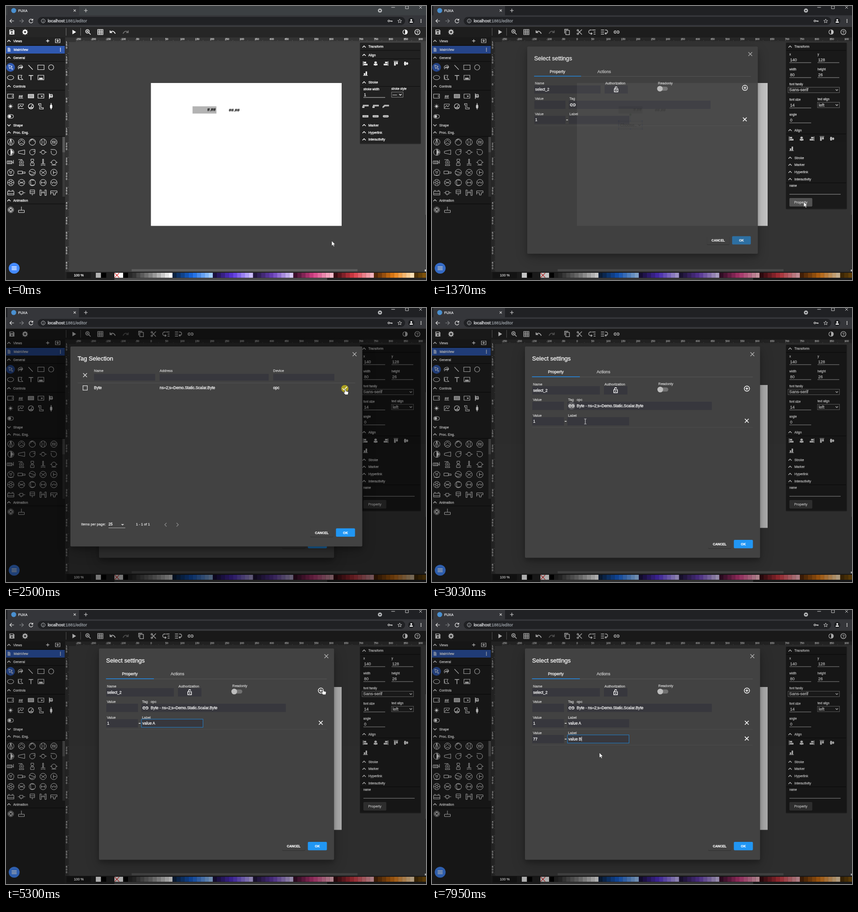
These frames come from a looping animation (926x605 px, 8000 ms). An HTML page:

```html
<!DOCTYPE html>
<html lang="en">
<head>
<meta charset="utf-8">
<title>Editor</title>
<style>
html,body{margin:0;width:100%;height:100%;overflow:hidden;background:#424242}
svg{display:block;width:926px;height:605px}
text{font-family:"Liberation Sans",Arial,sans-serif;white-space:pre;stroke-width:.28}
.sheet{filter:drop-shadow(0 6px 5px rgba(0,0,0,.2)) drop-shadow(0 9px 14px rgba(0,0,0,.24))}
#shade1,#shade2{animation:shade1 8s infinite cubic-bezier(.25,.8,.25,1)}
#shade2{animation-name:shade2}
#settings,#tags{animation:settings 8s infinite cubic-bezier(0,0,.2,1);transform-origin:464px 318px}
#tags{animation-name:tags;transform-origin:464px 306px}
#settings .ok{animation:ok 8s infinite ease-out}
#cursor{animation:cursor 8s infinite ease-in-out}
@keyframes shade1{0%,15.875%{opacity:0}20.875%,100%{opacity:1}}
@keyframes shade2{0%,22.375%{opacity:0}27.375%,32.5%{opacity:1}37.5%,100%{opacity:0}}
@keyframes settings{0%,15.875%{opacity:0;transform:scale(.7)}17.75%,100%{opacity:1;transform:none}}
@keyframes tags{0%,22.375%{opacity:0;transform:scale(.7)}24.25%,32.375%{opacity:1;transform:none}33.31%,100%{opacity:0;transform:none}}
@keyframes ok{0%,15.875%{fill:#424242}18.875%,100%{fill:#2196f3}}
@keyframes cursor{
0%,.75%{transform:translate(718px,518.5px)}
5.25%,6.25%{transform:translate(77px,197px)}
10.625%,12.125%{transform:translate(412px,272px)}
15.25%,17.5%{transform:translate(819.5px,432.5px)}
21%,22.625%{transform:translate(311px,214px)}
30.25%,32.25%{transform:translate(748px,179px)}
37%,62%{transform:translate(338px,250.5px)}
65.5%,67.5%{transform:translate(699px,174.5px)}
71.25%,72.375%{transform:translate(285px,286px)}
74.75%,98.25%{transform:translate(285px,312px)}
98.5%{transform:translate(352px,274px)}
99.25%,100%{transform:translate(369px,315px)}}
</style>
</head>
<body>
<svg id="stage" viewBox="0 0 926 605" xmlns="http://www.w3.org/2000/svg"></svg>
<script>
const UNIT = 32.85; // one ruler step
const rect = (x, y, w, h, fill, more = '') => `<rect x="${x}" y="${y}" width="${w}" height="${h}" fill="${fill}" ${more}/>`;
const disc = (x, y, r, fill, more = '') => `<circle cx="${x}" cy="${y}" r="${r}" fill="${fill}" ${more}/>`;
const text = (x, y, s, size = 7.3, fill = '#fff', more = '') =>
  `<text x="${x}" y="${y}" font-size="${size}" fill="${fill}" stroke="${fill}" ${more}>${s}</text>`;
const mid = 'text-anchor="middle"';
const icon = (x, y, d, color = '#f2f2f2', w = 1.1, fill = 'none') =>
  `<path transform="translate(${x} ${y})" d="${d}" fill="${fill}" stroke="${color}" stroke-width="${w}"/>`;
const solid = (x, y, d, color = '#f2f2f2') => icon(x, y, d, 'none', 0, color);
const group = (id, body) => `<g id="${id}">${body}</g>`;
const ring = r => `M${-r} 0a${r} ${r} 0 1 0 ${2 * r} 0a${r} ${r} 0 1 0 ${-2 * r} 0`;
const box = (w, h) => `M${-w / 2} ${-h / 2}h${w}v${h}h${-w}z`;
const cross = r => `M${-r} ${-r}L${r} ${r}M${r} ${-r}L${-r} ${r}`;
const plus = r => `M${-r} 0H${r}M0 ${-r}V${r}`;
const dots = 'M-.9-4h1.8v1.8h-1.8zM-.9-.9h1.8v1.8h-1.8zM-.9 2.2h1.8v1.8h-1.8z';
const UP = 'M-3.5 2L0-1.6 3.5 2', DOWN = 'M-3.5-1.6L0 2 3.5-1.6', SMALL = 'M-2.6-1.3L0 1.3 2.6-1.3';
const LINK = 'M-.8-2.6h-2.2a2.6 2.6 0 0 0 0 5.2h2.2M.8-2.6h2.2a2.6 2.6 0 0 1 0 5.2h-2.2M-2.8 0h5.6';
const rays = (n, a, b) => Array.from({length: n}, (_, i) => {
  const c = Math.cos(i * 2 * Math.PI / n), s = Math.sin(i * 2 * Math.PI / n);
  return `M${a * c} ${a * s}L${b * c} ${b * s}`;
}).join('');
const section = (x, y, name, d = UP) => icon(x + .5, y, d, '#fff', 1.4) + text(x + 10, y + 2.7, name);

function browser() {
  return rect(0, 0, 926, 21, '#202124', 'id="strip"') + rect(3, -6, 158, 30, '#35363a', 'rx="5"') + rect(0, 20.5, 926, 25, '#35363a') +
    disc(17, 10, 5.5, '#4a90d0') + text(27, 13, 'FUXA', 7.6, '#e8eaed') +
    icon(151.5, 10, cross(2.4), '#ddd') + icon(176, 10, plus(4), '#ddd') +
    disc(824.5, 10, 4.6, '#b4b6b8') + solid(824.5, 10.3, 'M-2.4-1.3h4.8L0 1.8z', '#202124') +
    icon(853.5, 3, 'M-4 0h8', '#ddd', 1) + icon(884, 3, box(6.5, 6), '#ddd', .9) + icon(914, 3, cross(3), '#ddd', .9) +
    icon(13, 33, 'M4.5 0h-9M-.3-4.2L-4.5 0l4.2 4.2', '#eee', 1.2) + icon(34, 33, 'M-4.5 0h9M.3-4.2L4.5 0 .3 4.2', '#85878a', 1.2) +
    icon(55, 33, 'M3.4-2.4A4.2 4.2 0 1 0 4.2 1M4.2-4.8v3.2H1', '#eee', 1.2) +
    rect(70, 24, 810, 18, '#202124', 'rx="9"') + icon(82, 33, ring(4.2) + 'M0-2.4v1M0-.5v3', '#c4c7ca', 1) +
    text(92, 36.2, 'localhost<tspan fill="#9aa0a6" stroke="#9aa0a6">:1881/editor</tspan>', 9.4, '#e8eaed', 'stroke-width="0"') +
    icon(844, 33, ring(1.9) + 'M2 0h5.4v2M5 0v2', '#c8c8c8', 1.4) +
    icon(868, 33, 'M0-4.2l1.2 3 3.2.2-2.5 2 .9 3.1L0 2.4l-2.8 1.7.9-3.1-2.5-2 3.2-.2z', '#d5d5d5', .9) +
    disc(893.5, 33, 7, '#1f2023') + disc(893.5, 31, 1.9, '#fff') + solid(893.5, 33, 'M-3.7 3.8q0-3 3.7-3t3.7 3z', '#fff') + solid(915, 33, dots);
}

function toolbar() {
  return rect(0, 45, 926, 24.5, '#262626') + rect(0, 45, 926, .8, '#4c4c4e') +
    solid(13, 57.5, 'M-5.5-5.5h8.8l2.2 2.2v8.8h-11z') + rect(9.5, 53.2, 6, 2.6, '#262626') + disc(13, 59.8, 1.8, '#262626') +
    icon(42, 57.5, ring(3.4), '#fff', 2.6) + icon(42, 57.5, rays(8, 4, 6.2), '#fff', 2.2) +
    rect(132, 48.5, 1, 17, '#777') + rect(164, 48.5, 1, 17, '#777') + solid(150, 57.5, 'M-3.5-5L4.5 0-3.5 5z', '#fff') +
    icon(179.6, 56, ring(3.8) + 'M2.8 2.8L7 7' + plus(1.8), '#fff', 1.5) +
    icon(208, 57.5, box(11.4, 11.4) + 'M-6-1.9H6M-6 1.9H6M-1.9-6V6M1.9-6V6', '#fff', 1.3) +
    icon(235, 58, 'M-5.5-4v4.6h4.6M-5 .2Q1-6 6 3', '#fff', 1.7) + icon(264, 58, 'M5.5-4v4.6h-4.6M5 .2Q-1-6-6 3', '#777', 1.7) +
    icon(880, 57.5, ring(5), '#fff', 1.2) + solid(880, 57.5, 'M0-5a5 5 0 0 1 0 10z', '#fff') +
    icon(907, 57.5, ring(5.6), '#fff', 1.4) + text(907, 60.8, '?', 9, '#fff', mid);
}

function selectionTools() {
  return icon(298, 57.5, 'M-5.5 3v-9H2.5M-3-3.7h8v9.5h-8z', '#fff', 1.3) +
    icon(325, 57.5, 'M-2.4-2.6L5.5 5.5M-2.4 2.6L5.5-5.5', '#fff', 1.3) + icon(321.5, 53.6, ring(1.7), '#fff', 1.3) + icon(321.5, 61.4, ring(1.7), '#fff', 1.3) +
    icon(353, 57.5, 'M0-4.5H7.5M3.5 0h4M3.5 4.5h4M-1-4.5h-2.5a4 4 0 0 0 0 8H-.5M-2.5 1.2L0 3.5-2.5 5.8', '#fff', 1.4) +
    icon(380, 57.5, 'M-7.5-4.5h7M-7.5 0h7M-7.5 4.5h7M1.5-4.5h2a3.7 3.7 0 0 1 0 7.5H2M4 .8L1.6 3 4 5.2', '#fff', 1.4) + icon(407, 57.5, LINK, '#fff', 1.5);
}

const O = ring(7);
const processIcons = [
  O + 'M0-7V7M0-7L-4 5M0-7L4 5', O + 'M-6.5 2L0-5 6.5 2M-5 5q5-5 10 0', O + 'M-5.5-4L0-7l5.5 6M-5.5-1L0-6', O + 'M-4-6q4 6 0 12M4-6q-4 6 0 12', O + ring(2.2) + 'M-5-2h4M1 2h4M-5 2h3M2-2h3',
  O + 'M0-7L6 0 0 7z', 'M-7-2L7-5V5L-7 2z', 'M6-6H0a6 6 0 1 0 6 6V-2H2M6-6v4', ring(4.3) + 'M-8 0h4M4 0h4M-2-4h4', 'M-7-6h7a6 6 0 1 1-6 6V-3',
  'M-8-3H3v6h-11zM-5-3v6M-2-3v6M1-3v6M3 0h3M6-5v8', ring(4.5) + ring(1.7) + 'M-7-6h9M-5 7h10M-4 4l-1 3M4 4l1 3', 'M-3-7h6v4l-2 2 3 3v5h-8v-5l3-3-2-2z' + ring(2), 'M-1-7h2V2h-2zM-5 4q5-3 10 0M-5 7q5-3 10 0', ring(5) + 'M-8 0h3M5 0h3M-5 6h10',
  O + ring(2) + 'M-4-5l2 3M4-5L2-2M-6 6h12', 'M-8-3H2v6H-8zM2-1h6v3H2z', O + 'M-6-3L6 1M-6 3q6 4 11-2', O + 'M-5-3L0 0l5-3M0 0v1M-4 4l4-4 4 3', O + 'M-1-4v8M-1 0h6',
  O + ring(2.6) + rays(6, 3, 6.5), O + 'M-6-3q6 5 12 0M-6 3q6-5 12 0', O + 'M-4-6L-3 6M4-5L-3-6M5 5L-3 6', O + 'M-4-3v6M4-3v6M-4 0h8', O + 'M-5-2l2 4 3-4 3 4 2-4',
  'M-7-3H7v8H-7zM-6-5h4M2-5h4M-7 2H7', 'M-8 0h4M-4-3h7v6h-7zM3 0h5M-1 3v3', 'M-5-6H5V2H-5zM-5-2H5M0 2v4', 'M-7-6v12h3v-12zM4-6v12h3v-12zM-4 0h8M0-4v4', 'M-7-4H7v4h-4v5h-4V0h-6zM-7-4v8'
];

function sidebar() {
  const lines = [86.5, 122, 185.5, 287.5, 436.5].map(y => rect(0, y, 130, 1, '#0d0d0d')).join('');
  return rect(0, 69, 130.5, 536, '#212121') + lines + section(6, 77, 'Views') + icon(92, 77, plus(3.5), '#fff', 1.3) +
    icon(114, 77, 'M-2-4h-3v8h10v-8H2M0-5v6M-2.4-1L0 1.6 2.4-1', '#fff', 1.2) +
    rect(0, 88, 129.5, 17, '#3059b0') + solid(6.5, 96.5, 'M-3-4.5h4l2.4 2.4v6.6H-3z', '#a9bce6') + text(17, 99.2, 'MainView', 7.4) + solid(120, 96.5, dots, '#fff') +
    section(6, 114, 'General') + section(6, 177, 'Controls') + section(6, 263, 'Shape', DOWN) + section(6, 279, 'Proc. Eng.') + section(6, 429, 'Animation') +
    disc(10, 135.5, 9.7, '#3059b0', 'id="pick"') +
    icon(10, 135.5, 'M-4-5l2 8 2-2.6L3.5 5 5 3.6 1-1 4-2z', '#fff', 1) +
    icon(32, 135.5, 'M-4 4q-3-6 2-8t6 1-4 4-2-1 7-1l-4 5', '#fff', 1.1) + icon(54, 135.5, 'M-4.5-5L5 5', '#fff', 1.1) +
    icon(77, 135.5, box(14, 10)) + icon(99.5, 135.5, ring(5.7)) +
    `<ellipse cx="10" cy="158" rx="7" ry="4.8" fill="none" stroke="#f2f2f2" stroke-width="1.1"/>` +
    icon(32, 158, 'M-5-5H3L1 0l4 4.5h-8zM-5 4.5V-5') + icon(55, 158, 'M-5-4.5H5M0-4.5v10', '#fff', 1.5) +
    icon(77, 158, box(13, 10)) + solid(77, 158, 'M-5 4l3-5 2 3 2-3 3 5z') +
    icon(10, 199, box(13, 9) + 'M4-2.5v5') + text(32.5, 202, '##', 8, '#fff', mid) + icon(32.5, 203.5, 'M-5 0h10') +
    icon(55, 199, box(12, 8), '#fff', 1.2, '#aaa') + icon(77, 199, box(13, 9)) + solid(79, 199.5, 'M-2.5-1.5h5L0 2z') +
    icon(99, 199, 'M-3.5-6v12M-3.5 0h8M-2-3.5h5v6h-5z', '#fff', 1.3) +
    disc(10, 221.5, 2.7, '#fff') + icon(10, 221.5, rays(8, 3.5, 5.2), '#fff', 1) +
    icon(33, 221.5, 'M-6-5V5H6M-5 3l4-5 3 3 4-5M-6-5H6') + icon(55, 221.5, ring(5.7) + 'M0 2L3-3M-4 3h8', '#fff', 1.3) +
    icon(77, 221.5, 'M-6-6h6v9h6M-6-3h3v9h9M-5-6v3M5 3v3') + icon(99.5, 221.5, 'M0-7V7', '#fff', 1.5) + rect(97, 218, 5, 8, '#fff', 'rx="2"') +
    rect(3.5, 239.8, 13, 8, 'none', 'rx="4" stroke="#fff"') + disc(8, 243.8, 3, '#fff') +
    processIcons.map((d, i) => icon(10.5 + i % 5 * 23.75, 300.5 + Math.floor(i / 5) * 22.35, d, '#eee', 1)).join('') +
    solid(10.5, 322.8, 'M0-6L5 0 0 6z') +
    rect(124.5, 289, 5.5, 132, '#3a3a3a') + rect(124.5, 289, 5.5, 34, '#595959') +
    icon(10.5, 450, rays(16, 2, 7.2), '#fff', .9) + icon(34, 450, 'M0-7V1M-6.5 1h13v5h-13z', '#eee', 1) +
    disc(18, 579, 12, '#448aff') + icon(18, 579, 'M-5.5-3.3h11M-5.5 0h11M-5.5 3.3h11', '#fff', 1.4);
}

function rulers() {
  let ticks = '', labels = '';
  for (let k = -5; k <= 18; k++) {
    const x = 319.5 + k * UNIT;
    for (let i = 0; i < 10; i++) ticks += `M${x + i * UNIT / 10} 79.5v${i ? (i == 5 ? -4 : -2.5) : -5}`;
    labels += text(x - 1, 74.6, k * 50, 5.6, '#ddd', 'stroke-width="0"');
  }
  for (let k = -3; k <= 12; k++) {
    const y = 170 + k * UNIT;
    for (let i = 0; i < 10; i++) if (y + i * UNIT / 10 > 80) ticks += `M141 ${y + i * UNIT / 10}h${i ? (i == 5 ? -4 : -2.5) : -5}`;
    [...String(k * 50)].forEach((c, i) => {
      if (y + i * 6 > 74) labels += text(132, y + 4.5 + i * 6, c, 5.6, '#ddd', 'stroke-width="0"');
    });
  }
  return rect(130.5, 69, 796, 10.5, '#333') + rect(130.5, 69, 10.5, 518, '#333') + icon(0, 0, ticks, '#8a8a8a', .5) + labels;
}

function palette() {
  const ramps = ['#343434 #8c8c8c #fff', '#0b2444 #1769e6 #a2cdff', '#1b1040 #5b35e0 #cbbcff', '#22163f #6c41bd #d8c8f7',
    '#3f0f2e #d53f86 #fdbccb', '#3a0c12 #da3b45 #f8b4bd', '#552809 #ea8014 #fde0b5', '#4f3207 #b9790f #f5d890'];
  const rgb = c => (c.length < 5 ? [...c.slice(1)].map(d => d + d) : c.match(/\w\w/g)).map(v => parseInt(v, 16));
  const w = 8.88;
  let out = rect(239, 589, 11, 11, '#fff') + icon(244.5, 594.5, cross(5), '#d22', 1.1) +
    rect(250, 589, 8.4, 11, '#fff') + rect(258.4, 589, 11, 11, '#000') + rect(269, 589, 9.4, 11, '#282828');
  ramps.forEach((ramp, g) => {
    const stops = ramp.split(' ').map(rgb);
    for (let i = 0; i < 10; i++) {
      const p = i / 9 * 2, a = p < 1 ? 0 : 1;
      const c = stops[a].map((v, j) => Math.round(v + (stops[a + 1][j] - v) * (p - a)));
      out += rect(278.3 + (g * 10 + i) * w, 589, w + .1, 11, `rgb(${c})`);
    }
  });
  return out;
}

function canvasArea() {
  const grips = [411.5, 437.5, 463.5].flatMap(x => [254, 262.8, 271.5].map(y => x == 437.5 && y == 262.8 ? '' : disc(x, y, 1.6, '#4f80ff'))).join('');
  return rect(130, 69, 796, 518, '#424242') + rect(319.5, 170, 420.5, 315.5, '#fff') +
    rect(411.3, 221.5, 52.7, 16, '#b3b3b3') + text(462, 232, '#.##', 9.2, '#000', 'text-anchor="end"') + text(491.5, 233, '##.##', 9.4, '#000') +
    group('choice', rect(411.8, 254.3, 51.7, 17, '#fff', 'stroke="#777" stroke-width=".8"') + text(414.8, 266, 'Choose..', 9.1, '#111', 'stroke-width=".1"') + icon(457.5, 263, SMALL, '#111', 1.4)) +
    group('grips', rect(411.5, 254, 52, 17.5, 'none', 'stroke="#4f80ff" stroke-width=".6" stroke-dasharray="3"') + icon(437.5, 240, 'M0 0v14', '#4f80ff', .6) + disc(437.5, 240, 2.4, '#4b9b4b') + grips) +
    rulers() + rect(277, 581, 498, 5, '#5c5c5c') + rect(924, 186, 2, 275, '#585858') + rect(923.5, 582, 2.5, 4, '#fff') +
    rect(130.5, 587, 796, 18, '#222') + rect(134, 588, 53, 13.5, '#181818') + text(160.5, 597.2, '100 %', 7.6, '#fff', mid) +
    rect(198, 589, 11.5, 11, '#b3b3b3', 'id="fill"') + rect(209.5, 589, 11.5, 11, '#000') + palette() + rect(239, 600.5, 469, 4.5, '#4a4a4a');
}

const under = (x, y, w = 48) => rect(x, y, w, .9, '#ddd');
const rule = y => rect(781, y, 132, 1, '#0d0d0d');
const field = (x, y, label, value) => text(x, y, label, 6.6) + text(x + 1.5, y + 12.5, value, 9) + under(x, y + 15.6);
const dropdown = (x, y, w, h, value) => rect(x, y, w, h, '#262626', 'stroke="#999" stroke-width=".8"') + text(x + 2.5, y + h / 2 + 3, value, 9.4) + icon(x + w - 6, y + h / 2, SMALL, '#fff', 1.3);

function alignSection(y) {
  const marks = ['M-5-5V5M-3-3.5h4v2.5h-4zM-3 1h7v2.5h-7z', 'M0-5V5M-2-3.5h4v2.5h-4zM-3.5 1h7v2.5h-7z', 'M5-5V5M3-3.5h-4v2.5h4zM3 1h-7v2.5h7z', 'M-5-5H5M-3.5-3h2.5v7h-2.5zM1-3h2.5v4h-2.5z', 'M-5 0H5M-3.5-3.5h2.5v7h-2.5zM1-2h2.5v4h-2.5z'];
  return section(789, y, 'Align') + rule(y + 8) + marks.map((d, i) => icon(792.5 + i * 22.4, y + 19, d, '#fff', 1.1, '#ddd')).join('') +
    icon(792.5, y + 41, 'M-5 4.5H5M-3 0h2v3h-2zM1-4h2v7h-2z', '#fff', 1.2, '#ddd');
}

const panelBase = h => rect(780, 81, 135, h + 2, '#000', 'opacity=".35" rx="2"') + rect(781, 81, 132.5, h, '#212121') + section(789, 89.7, 'Transform') + rule(97.5);

function panelShort() {
  const strokes = [0, 1, 2].map(i => icon(792.5 + i * 22.4, 221.5, i < 2 ? 'M-7 1.8h3V-1.6H7' : 'M-7 2q2 0 3-2t3-1.6h8', '#ddd', 3.4) + icon(792.5 + i * 22.4, 221.5, 'M-6 1.8h2V-1.6H6', '#777', .8) +
    rect(786 + i * 22.4, 241, 13, 5, '#ccc', `rx="${i * 1.2}"`) + rect(788 + i * 22.4, 243.1, 9, .8, '#555')).join('');
  return panelBase(222) + alignSection(108) + section(789, 168.7, 'Stroke') + rule(177) + text(788, 185.6, 'stroke width', 6.6) + text(789, 199, '1', 9) + under(788, 201.5) +
    text(849.5, 185, 'stroke style', 6.6) + dropdown(850, 190, 25.5, 11.5, '—') + strokes +
    section(789, 263, 'Marker') + section(789, 278.8, 'Hyperlink') + section(789, 294.6, 'Interactivity');
}

function panelLong() {
  return panelBase(366) + field(788, 109, 'x', 140) + field(850, 109, 'y', 128) + field(788, 142, 'width', 80) + field(850, 142, 'height', 26) +
    text(788, 174.8, 'font family', 6.6) + dropdown(785, 179.3, 113.5, 12.2, 'Sans-serif') + field(788, 209, 'font size', 14) +
    text(850, 208.2, 'text align', 6.6) + dropdown(850, 212.5, 48.5, 12.2, 'left') + field(788, 242, 'angle', 0) + alignSection(274) +
    section(789, 335, 'Stroke') + section(789, 350.6, 'Marker') + section(789, 366.4, 'Hyperlink') + section(789, 382.2, 'Interactivity') + rule(390) +
    text(788, 398.5, 'name', 6.6) + under(788, 415.3, 113) + rect(788, 424, 50.5, 18.7, '#424242', 'rx="2" id="property"') + text(813, 436, 'Property', 7.7, '#fff', mid);
}

const INPUT = '#37373d';
const input = (x, y, w, h = 18.4) => rect(x, y, w, h, INPUT);
const label = (x, y, s) => text(x, y, s, 7.8, '#c9c9c9');
const value = (x, y, s, more) => text(x, y, s, 8.54, '#fff', more);
const actions = (x, y) => rect(x, y + .8, 50.5, 19, '#333', 'rx="2"') + rect(x, y, 50.5, 18.6, '#424242', 'rx="2"') + text(x + 25.2, y + 12, 'CANCEL', 7.2, '#fff', mid + ' font-weight="bold"') +
  rect(x + 56.5, y, 42, 18.6, '#2196f3', 'rx="2" class="ok"') + text(x + 77.5, y + 12, 'OK', 7.2, '#fff', mid + ' font-weight="bold"');
const sheet = (x, w, h, title) => rect(x, 85, w, h, '#424242', 'rx="2" class="sheet"') +
  text(x + 15.7, 116, title, 13.1, '#fff') + icon(x + w - 17, 102, cross(4.2), '#b5b5b5', 1.3);
const optionRow = (y, a, b) => label(222.5, y - 1.5, 'Value') + input(221, y, 70) + value(223, y + 11.8, a, `id="value${b}"`) + rect(292.6, y + 8.6, 4, 1.3, '#fff') +
  label(300, y - 1.5, 'Label') + input(298.5, y, 136) + value(300.8, y + 11.8, '', `id="label${b}"`) + icon(694, y + 8, cross(4.2), '#fff', 1.6) + rect(221, y + 22, 486, .8, '#4e4e4e');

function settings() {
  return sheet(205, 518.3, 466.5, 'Select settings') + text(273, 144.3, 'Property', 9.2, '#fff', mid) + text(378, 144.3, 'Actions', 9.2, '#ccc', mid) +
    rect(220.5, 151.8, 487, .8, '#5e5e5e') + rect(220.5, 151, 105.5, 1.5, '#1e88e5') +
    label(222.5, 170.5, 'Name') + input(221, 172.5, 149) + value(223, 184.5, 'select_2') +
    label(380.3, 170.5, 'Authorization') + input(379, 172.5, 52) + icon(404.8, 182, 'M-4-1.6h8v6.6h-8zM-2.2-1.6V-4a2.2 2.2 0 0 1 4.4 0', '#fff', 1.4) + disc(404.8, 183.6, 1.2, '#fff') +
    label(499, 170, 'Readonly') + rect(498, 175.5, 23, 9, '#717171', 'rx="4.5"') + disc(503.2, 180, 6.3, '#bdbdbd') +
    icon(694.3, 178, ring(5.8) + plus(3.2), '#fff', 1.4) +
    label(222.5, 205, 'Value') + input(221, 207, 70) + label(300, 205, 'Tag') + input(298.5, 207, 318.5) + disc(307.7, 216, 8.3, '#5b5b5f', 'id="linkFocus"') +
    icon(307.5, 216.3, LINK, '#fff', 1.4) + group('chosenTag', label(319, 205, 'opc') + value(319, 219.2, 'Byte - ns=2;s=Demo.Static.Scalar.Byte')) +
    optionRow(241, '1', 1) + group('second', optionRow(275.8, '', 2)) +
    rect(0, 0, 70, 18, 'none', 'id="focus" stroke="#2382cf"') + rect(0, 0, .9, 10, '#fff', 'id="caret"') + actions(609, 512);
}

function tags() {
  return sheet(142, 643.5, 441.5, 'Tag Selection') + label(194, 140.7, 'Name') + label(338.7, 140.7, 'Address') + label(589, 140.7, 'Device') +
    input(194, 145.5, 135, 15) + input(338.7, 145.5, 240.5, 15) + input(589, 145.5, 135, 15) + icon(174.3, 148.3, cross(4.2), '#ddd', 1.4) +
    rect(158, 165, 612, .8, '#565656') + icon(174.5, 176.5, box(9.6, 9.6), '#ddd', 1.3) +
    value(194, 179.2, 'Byte') + value(338.7, 179.2, 'ns=2;s=Demo.Static.Scalar.Byte') + value(589, 179.2, 'opc') +
    disc(747, 178, 8, '#aba020', 'id="press"') + icon(747, 177.5, 'M-5 0l3.2 3.3L5-3.6', '#fff', 1.5) +
    text(165.5, 480.2, 'Items per page:', 7.8, '#ddd') + text(226, 480.2, '25', 8.2) + rect(226, 485, 37, .9, '#bbb') + solid(257, 478.3, 'M-3.4-1.4h6.8L0 2z', '#ccc') +
    text(286.5, 480.2, '1 - 1 of 1', 7.8, '#ddd') + icon(352, 478.5, 'M2-4L-2 0l4 4', '#8a8a8a', 1.4) + icon(378, 478.5, 'M-2-4L2 0l-4 4', '#8a8a8a', 1.4) + actions(671, 486.5);
}

const pointer = group('arrow', icon(0, 0, 'M0 0V11.3L2.6 8.9 4.5 12.8 6.4 12 4.6 8.2H8z', '#222', .7, '#fff')) +
  group('hand', icon(0, 0, 'M-1.2 .8Q0-.6 1.2 .8V4.5L6 5.8Q7 6 7 7.5L5.8 12.5H0L-3.8 8Q-3.5 6-1.2 7.6z', '#222', .7, '#fff')) +
  group('beam', icon(0, 0, 'M-2.4-5.6H-.6L0-5 .6-5.6H2.4M0-5V5M-2.4 5.6H-.6L0 5 .6 5.6H2.4', '#e0e0e0', 1));

document.getElementById('stage').innerHTML = canvasArea() + browser() + toolbar() + group('selTools', selectionTools()) + sidebar() +
  group('short', panelShort()) + group('long', panelLong()) + group('shade1', rect(0, 45.5, 926, 560, '#000', 'fill-opacity=".32"')) +
  group('settings', settings()) + group('shade2', rect(0, 45.5, 926, 560, '#000', 'fill-opacity=".32"')) + group('tags', tags()) + group('cursor', pointer);

const $ = id => document.getElementById(id);
const show = (id, on) => { $(id).style.display = on ? '' : 'none'; };
const set = (id, attrs) => { for (const k in attrs) $(id).setAttribute(k, attrs[k]); };
const at = (t, steps) => steps.filter(s => s[0] <= t).pop()[1];

const pointerKind = [[0, 'arrow'], [1660, 'hand'], [1850, 'arrow'], [2390, 'hand'], [2620, 'arrow'], [2900, 'beam'], [3320, ''], [4980, 'arrow'], [5220, 'hand'], [5440, 'arrow'], [5640, 'beam'], [5860, 'arrow'], [6120, ''], [7890, 'arrow']];
const focused = [[0, ''], [3190, 'label1'], [5440, ''], [5700, 'value2'], [6380, 'label2']];
const typed = {
  label1: [[0, ''], [4050, 'v'], [4130, 'va'], [4210, 'val'], [4290, 'valu'], [4370, 'value'], [4660, 'value '], [4780, 'value A']],
  value2: [[0, ''], [6120, '7'], [6250, '77']],
  label2: [[0, ''], [6720, 'v'], [6830, 'va'], [6980, 'val'], [7060, 'valu'], [7150, 'value'], [7560, 'value '], [7690, 'value B']]
};
const caretOn = [[0, 0], [3190, 1], [3530, 0], [3730, 1], [3860, 0], [4050, 1], [4980, 0], [5700, 1], [5980, 0], [6120, 1], [7360, 0], [7560, 1]];

function render(t) {
  const dropping = t >= 470 && t < 950, selected = t >= 970;
  set('strip', {fill: t < 470 ? '#3c4043' : '#202124'}); // the window gains focus on the first click
  set('pick', dropping ? {cx: 77, cy: 199} : {cx: 10, cy: 135.5});
  show('choice', t >= 880);
  ['grips', 'selTools', 'long'].forEach(id => show(id, selected));
  show('short', !selected);
  set('fill', {fill: selected ? '#fff' : '#b3b3b3'});
  set('property', {fill: t > 1190 && t < 1450 ? '#6a6a6a' : '#424242'});
  show('linkFocus', t >= 1700 && t < 3250);
  show('chosenTag', t >= 2600);
  show('press', t >= 2450 && t < 2600);
  show('second', t >= 5440);
  for (const id in typed) $(id).textContent = at(t, typed[id]);

  const active = at(t, focused);
  show('focus', active);
  show('caret', active && at(t, caretOn));
  if (active) {
    const field = $(active), y = active == 'label1' ? 241 : 275.8;
    set('focus', active == 'value2' ? {x: 221, y, width: 70} : {x: 298.7, y, width: 135.6});
    set('caret', {x: +field.getAttribute('x') + field.getComputedTextLength() + .2, y: y + 4});
  }
  const kind = at(t, pointerKind);
  ['arrow', 'hand', 'beam'].forEach(id => show(id, id == kind));
}

let start;
function tick(now) {
  start ??= now;
  render((now - start) % 8000);
  requestAnimationFrame(tick);
}
render(0);
requestAnimationFrame(tick);
</script>
</body>
</html>
```
